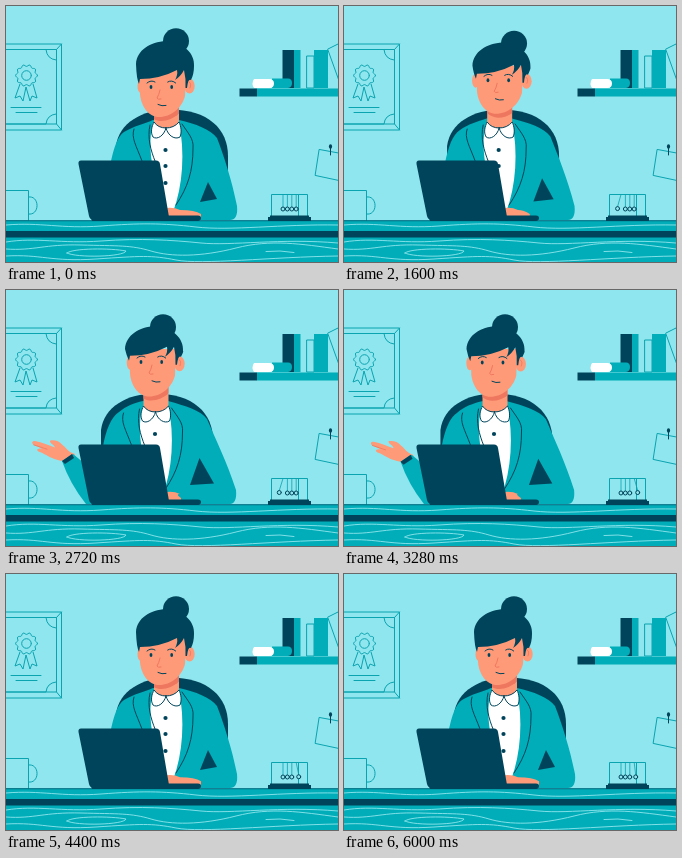
An HTML page with a canvas for the animation above (6.08 s loop, 332 px wide and 256 px high).

```html
<!DOCTYPE html>
<html lang="en">
<head>
<meta charset="utf-8">
<title>At the desk</title>
<style>
html, body { margin: 0; width: 100%; height: 100%; overflow: hidden; background: #8fe6ee; }
canvas { display: block; width: 332px; height: 256px; }
</style>
</head>
<body>
<canvas id="stage"></canvas>
<script>
const LOOP = 6080, STEP = 80, W = 332, H = 256;
const SKY = '#8fe6ee', NAVY = '#00445b', TEAL = '#00adb8', LINE = '#0aa3b0',
      SKIN = '#ff9a78', SHADE = '#ee775f', WHITE = '#ffffff', GRAIN = '#8fe6ee';

const canvas = document.getElementById('stage');
const ctx = canvas.getContext('2d');
const dpr = window.devicePixelRatio || 1;
canvas.width = W * dpr;
canvas.height = H * dpr;

// time, hair x/y, face x/y, bun x/y, left ear shown
const headKeys = [
  [0, 0, 0, 0, 0, 170, 35, 0],
  [680, 0, 0, 0, 0, 170, 35, 0],
  [1040, 1, 2, 1.5, -5, 176, 38, .3],
  [1240, 1, 2, 1.5, -5, 176, 38, .3],
  [2040, -5, 1, -4.5, -9, 162, 37, 1],
  [2640, -11, 1, -10, -9, 157, 37, .2],
  [3000, -11, 1, -10, -9, 157, 37, .2],
  [3560, -4, 1, -3.5, -8, 165, 37, 1],
  [4320, 0, 0, 0, 0, 170, 35, 0],
  [LOOP, 0, 0, 0, 0, 170, 35, 0]
];
const leanKeys = [[0, 0], [1240, 0], [2000, 1], [3120, 1], [3960, 0], [LOOP, 0]];
// time, wrist x/y, angle in degrees
const armKeys = [
  [0, 112, 212, 40],
  [1600, 112, 212, 40],
  [1920, 80, 178, 45],
  [2080, 67, 162, 38],
  [2440, 62, 166, 18],
  [3240, 62, 166, 18],
  [3600, 79, 191, 30],
  [3840, 112, 212, 30],
  [LOOP, 112, 212, 40]
];
const blinks = [400, 1040, 4880];

const mix = (a, b, u) => a + (b - a) * u;
const ease = u => u * u * (3 - 2 * u);

function sample(keys, t) {
  let i = 1;
  while (i < keys.length - 1 && keys[i][0] < t) i++;
  const a = keys[i - 1], b = keys[i];
  const u = ease((t - a[0]) / (b[0] - a[0]));
  return a.slice(1).map((v, n) => mix(v, b[n + 1], u));
}

function paint(path, fill, stroke, width = 1) {
  const p = typeof path === 'string' ? new Path2D(path) : path;
  if (fill) { ctx.fillStyle = fill; ctx.fill(p); }
  if (stroke) { ctx.strokeStyle = stroke; ctx.lineWidth = width; ctx.stroke(p); }
}

function oval(x, y, rx, ry, fill, stroke, width) {
  const p = new Path2D();
  p.ellipse(x, y, rx, ry, 0, 0, Math.PI * 2);
  paint(p, fill, stroke, width);
}

function box(x, y, w, h, fill, stroke) {
  const p = new Path2D();
  p.rect(x, y, w, h);
  paint(p, fill, stroke);
}

function shifted(dx, dy, render) {
  ctx.save();
  ctx.translate(dx, dy);
  render();
  ctx.restore();
}

function diploma() {
  box(-10, 38, 65.5, 86, null, LINE);
  box(-10, 43.5, 60.5, 74.5, null, LINE);
  paint('M50.5 43.5L55.5 38M50.5 118L55.5 124', null, LINE);
  paint('M-2 43.5H40Q41 53 50 54M-2 118H40Q41 109 50 108', null, LINE);
  paint('M14 78L9 92L14 90L17 95L20 81L24 95L26 90L31 92L27 78', null, LINE);
  const p = new Path2D();
  for (let i = 0; i <= 80; i++) {
    const a = i / 80 * Math.PI * 2, r = 10 + .9 * Math.cos(a * 10);
    p.lineTo(20.5 + r * Math.cos(a), 69.5 + r * Math.sin(a));
  }
  paint(p, SKY, LINE);
  oval(20.5, 69.5, 4.8, 4.8, null, LINE);
  paint('M5 101.5H35M10 106.5H31', null, LINE);
}

function shelf() {
  paint('M322 43L332 38L346 76L336 82Z', null, LINE);
  box(276.5, 44, 11.5, 38, NAVY);
  box(288, 44, 6.5, 38, TEAL);
  box(301, 50, 7, 32, null, LINE);
  box(308, 44, 14, 38, TEAL);
  paint('M266 72.5H282Q286 72.5 286 77T282 82H266Z', TEAL);
  paint('M248 73H263Q268 73 268 77.5T263 82H248Q245 77.5 248 73Z', WHITE);
  box(233.5, 82.5, 17.5, 8, NAVY);
  box(251, 82.5, 81, 8, TEAL);
}

function room() {
  box(0, 0, W, H, SKY);
  diploma();
  shelf();
  paint('M313.5 143.5L338 148L333 174.5L309.5 169.5Z', null, LINE);
  paint('M324.5 141V149', null, NAVY);
  oval(324.5, 140.5, 1.6, 2.2, NAVY);
  paint('M-2 184.5H22.5V215H-2M22.5 191C34 189 34 210 22.5 208', null, LINE);
}

function desk() {
  box(0, 214.5, W, 42, TEAL);
  box(0, 214.3, W, 1, '#00697c');
  box(0, 225, W, 6.5, NAVY);
  paint('M0 219C35 216 55 223 95 220S155 217 190 221S275 218 332 219', null, GRAIN, .9);
  paint('M0 236C30 231 55 238 95 235S165 234 195 237S275 232 332 237', null, GRAIN, .9);
  paint('M0 243C28 245 38 238 75 239S125 239 145 245S195 251 230 242S295 238 332 243', null, GRAIN, .9);
  paint('M0 250C35 248 45 256 90 253S145 249 170 254S265 251 332 250', null, GRAIN, .9);
  paint('M61 247C66 242 105 242 120 245C118 251 70 252 61 247Z', null, GRAIN, .9);
  paint('M260 245.5Q274 244 288 246.5', null, GRAIN, .9);
}

function cradle(t) {
  const swing = -Math.sin(t / LOOP * Math.PI * 10);
  paint('M265.5 210V188.5H292.5V210M274 188.5H301.5V210', null, LINE);
  for (let i = 0; i < 4; i++) {
    const top = 277 + i * 4.4;
    let a = 0;
    if (i === 0) a = Math.min(swing, 0) * .26;
    if (i === 3) a = Math.max(swing, 0) * .26;
    const x = top + 14.5 * Math.sin(a), y = 188.5 + 14.5 * Math.cos(a);
    paint(`M${top} 188.5L${x} ${y - 2}`, null, LINE, .8);
    oval(x, y, 2, 2, SKY, NAVY, 1);
  }
  box(264, 209.5, 39, 2, NAVY);
  box(262, 211, 43, 4, NAVY);
}

function chair(lean) {
  shifted(-15 * lean, 0, () =>
    paint('M110 155V140C113 117 136 103.5 164 103.5C202 103.5 222 123 222 150V175H115Z', NAVY));
}

function jacket(lean) {
  const p = (x, y, leanX, leanY) => `${mix(x, leanX, lean)} ${mix(y, leanY, lean)} `;
  paint(`M${p(104, 214, 97, 214)}L${p(104, 160, 97, 156)}` +
    `C${p(108, 140, 100, 140)}${p(112, 130, 105, 127)}${p(118, 126, 113, 122)}` +
    `C${p(128, 120, 120, 116)}${p(138, 118, 128, 113)}${p(147, 114, 137, 111)}` +
    `L${p(173, 114, 162, 111)}` +
    `C${p(190, 118, 180, 116)}${p(204, 123, 194, 120)}${p(211, 132, 201, 129)}` +
    `C${p(218, 150, 209, 148)}${p(226, 175, 221, 172)}${p(231, 200, 230, 200)}` +
    `C${p(232, 210, 231, 210)}${p(229, 214, 228, 214)}${p(224, 214, 224, 214)}Z`, TEAL);
  paint(`M${p(202, 176, 193.5, 168)}L${p(194, 196, 184, 195)}L${p(211, 193, 208, 193.5)}Z`, NAVY);
}

function shirt() {
  paint('M147 117H173C179 145 177 180 167 206H154C152 175 139 148 147 117Z', WHITE);
  paint('M128 123C125 132 130 139 136 155M176 118C182 127 188 133 187 142C187 165 182 181 170 199M144 119C141 132 145 145 149 155', null, NAVY);
  for (const y of [144, 160, 177]) oval(159.5, y, 2.1, 2.1, NAVY);
}

function neck(shift, face) {
  const throat = new Path2D('M148 96H173V117Q168 123 160 123T148 117Z');
  shifted(shift, 0, () => {
    paint(throat, SKIN);
    ctx.clip(throat);
    ctx.translate(2 - shift, 4);
    paint(face, SHADE);
  });
  shifted(shift, 0, () => {
    paint('M160 122C158 130 151 134 147 131C144 126 146 120 148 116Q152 122 160 122Z', WHITE, NAVY);
    paint('M160 122C162 130 169 134 174 131C176 126 175 120 173 116Q168 122 160 122Z', WHITE, NAVY);
  });
}

function head(t, shift) {
  const [hx, hy, fx, fy, bx, by, ear] = sample(headKeys, t);
  const h = (x, y) => `${x + hx} ${y + hy} `;
  const f = (x, y) => `${x + fx} ${y + fy * .8} `;
  const j = (x, y) => `${x + fx} ${y + fy * .5} `;
  const face = new Path2D(
    `M${h(134, 58)}L${j(134, 88)}C${j(135, 101)}${j(143, 111)}${j(153, 111)}` +
    `C${j(165, 111)}${j(176, 102)}${j(179, 90)}L${h(181, 58)}Z`);
  neck(shift, face);
  oval(bx, by, 13, 12.8, NAVY);
  oval(183.5 + fx, 80 + fy * .7, 5.2, 7.5, SKIN);
  oval(135 - 4 * ear + fx, 80 + fy * .8, 3.5, 7, SKIN);
  paint(face, SKIN);
  paint(`M${h(130, 58)}C${h(131, 44)}${h(144, 36)}${h(160, 35)}C${h(178, 36)}${h(189, 48)}${h(188, 60)}` +
    `Q${f(188, 68)}${f(185, 74)}Q${f(182, 72)}${f(181, 82)}L${f(179.5, 82)}Q${f(180, 72)}${f(178, 64)}` +
    `Q${f(175, 70)}${f(169, 74)}Q${f(172, 69)}${f(171, 64)}Q${f(154, 73)}${f(134, 73)}` +
    `L${f(133, 78)}Q${f(130.5, 73)}${h(130, 58)}Z`, NAVY);

  const shut = blinks.some(b => Math.abs(t - b) <= 100);
  for (const side of [0, 1]) {
    const x = 145 + side * 20.7 + fx, y = 81 + fy;
    if (shut) paint(`M${x - 3.2} ${y - .5}Q${x} ${y + 1.5} ${x + 3.2} ${y - .5}`, null, NAVY);
    else oval(x, y, 1.4, 2, NAVY);
    paint(`M${x - 4} ${y - 4 - side}Q${x} ${y - 7.5} ${x + 4} ${y - 5 + side}`, null, NAVY);
  }
  shifted(fx * .8, fy, () => paint('M154 84Q153 89 151 92Q152 94 155 93', null, SHADE));
  shifted(fx * .6, fy * .85, () => paint('M152 98.5Q156 100.5 160 99.5', null, NAVY));
  shifted(fx, fy * .7, () => paint('M183 76q3 1 1 6', null, SHADE, .8));
}

function raisedArm(t) {
  const [x, y, deg] = sample(armKeys, t);
  if (x > 105) return;
  ctx.save();
  ctx.translate(x, y);
  ctx.rotate(deg * Math.PI / 180);
  paint('M6 -4C-2 -4 -5 -8 -9 -9C-13 -12 -19 -11 -22 -9C-21 -6 -17 -7 -15 -4' +
    'C-21 -4 -29 -5 -36 -4C-39 -3 -39 -1 -36 0L-27 1C-31 2 -33 4 -29 5C-22 5 -19 7 -12 7C-6 7 -1 6 6 7Z', SKIN);
  paint('M-36 0L-22 0', null, SHADE, .7);
  ctx.restore();
  paint(`M${x - 6} ${y + 5}L${x + 5} ${y - 2}L${x + 22} ${y + 12}L108 214H80Q${x + 2} ${y + 28} ${x - 6} ${y + 5}Z`, TEAL);
  paint(`M${x - 6} ${y + 5}L${x + 4} ${y - 2}L${x + 6} ${y + 2}L${x - 3} ${y + 8}Z`, NAVY);
}

function laptop(t, lean) {
  const dy = (1 - lean) * .7 * Math.sin(t / LOOP * Math.PI * 2 * 19);
  const tip = mix(195, 175, lean);
  paint(`M160 ${202 + dy}Q168 ${201 + dy} 174 ${204 + dy}Q${tip - 6} ${204 + dy} ${tip} ${208 + dy}V211H160Z`, SKIN);
  paint('M84 209.5H192Q195 209.5 195 212T192 215H86Z', NAVY);
  paint('M75 154.5H150Q153.5 154.5 154 158L163 211Q163 214 160 214H88Q84 214 83 210L72.5 158Q72 154.5 75 154.5Z', NAVY);
}

function draw(t) {
  const [lean] = sample(leanKeys, t);
  const shift = -10.5 * lean;
  ctx.setTransform(dpr, 0, 0, dpr, 0, 0);
  ctx.lineJoin = ctx.lineCap = 'round';
  room();
  chair(lean);
  jacket(lean);
  shifted(shift, 0, shirt);
  raisedArm(t);
  head(t, shift);
  desk();
  laptop(t, lean);
  cradle(t);
}

const start = performance.now();
function tick(now) {
  const t = Math.max(0, now - start) % LOOP;
  draw(Math.floor(t / STEP) * STEP);
  requestAnimationFrame(tick);
}
draw(0);
requestAnimationFrame(tick);
</script>
</body>
</html>
```
